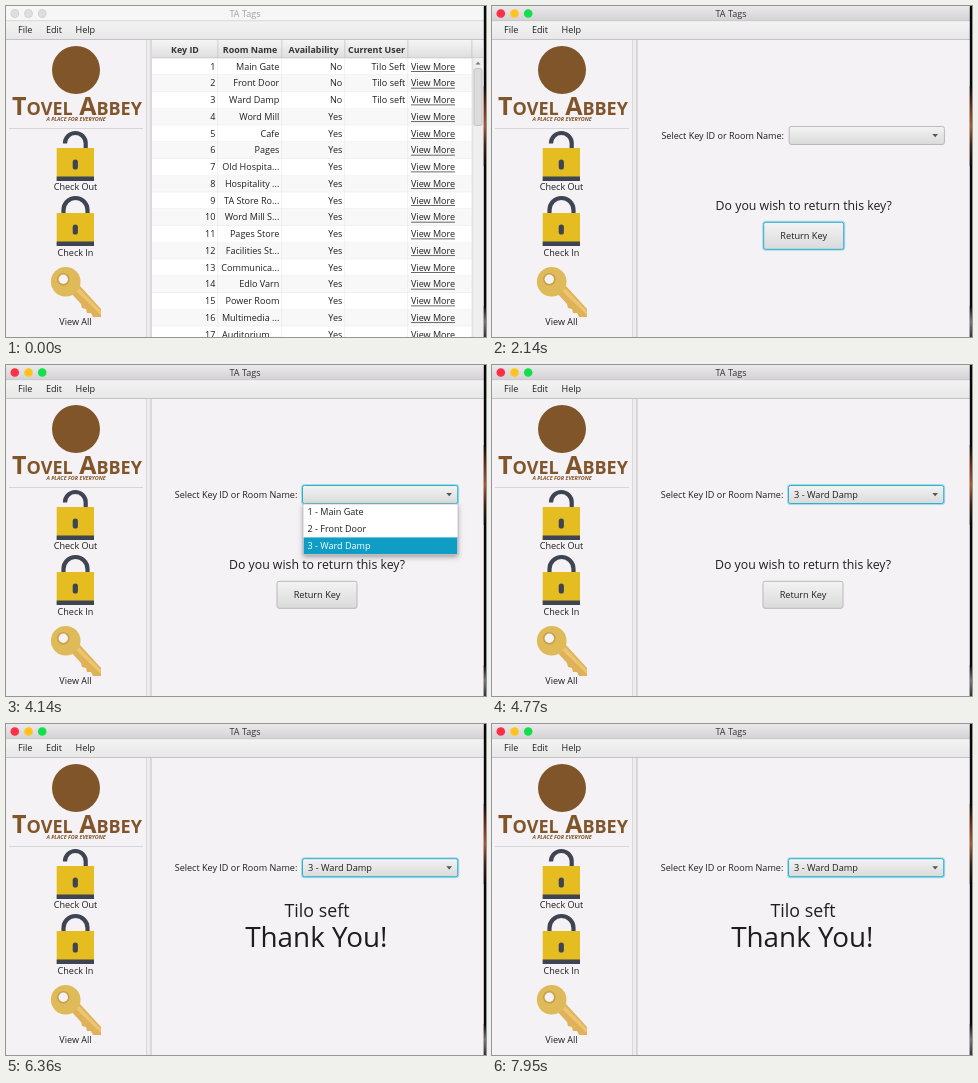
Animation of 480 by 331 pixels, one loop 8 s. Source, as an HTML page with a canvas:

```html
<!DOCTYPE html>
<html lang="en">
<head>
<meta charset="utf-8">
<style>
  html, body { margin: 0; height: 100%; overflow: hidden; background: #f4f2f4; }
  canvas { display: block; width: 100vw; height: 100vh; }
</style>
</head>
<body>
<canvas id="stage" width="480" height="331"></canvas>
<script>
const ctx = document.getElementById('stage').getContext('2d');
const LOOP = 8000;
// Moments of the user's actions, in ms
const OPEN_PAGE = 1500, OPEN_LIST = 2900, SELECT = 4600, RETURN = 5900;
const HOVERS = [3050, 3250, 3450];

const INK = '#1e1e1e', PAPER = '#f4f2f4', DARK = '#3e4452', GOLD = '#e6bd20';
const BROWN = '#80552a', CYAN = '#2fb0cf';
const ROOMS = ['Main Gate', 'Front Door', 'Ward Damp', 'Word Mill', 'Cafe', 'Pages',
  'Old Hospita...', 'Hospitality ...', 'TA Store Ro...', 'Word Mill S...', 'Pages Store',
  'Facilities St...', 'Communica...', 'Edlo Varn', 'Power Room', 'Multimedia ...', 'Auditorium ...'];
const USERS = ['Tilo Seft', 'Tilo seft', 'Tilo seft'];
const COLUMNS = [['Key ID', 146, 212], ['Room Name', 212, 276], ['Availability', 276, 339],
  ['Current User', 339, 402], ['', 402, 466]];

function text(str, x, y, { size = 9.05, align = 'left', color = INK, style = '' } = {}) {
  ctx.font = `${style} ${size}px "Open Sans", "Noto Sans", sans-serif`;
  ctx.textAlign = align;
  ctx.fillStyle = color;
  ctx.fillText(str, x, y);
}

function rect(x, y, w, h, fill) {
  ctx.fillStyle = fill;
  ctx.fillRect(x, y, w, h);
}

function gradient(y1, y2, ...stops) {
  const g = ctx.createLinearGradient(0, y1, 0, y2);
  stops.forEach((color, i) => g.addColorStop(i / (stops.length - 1), color));
  return g;
}

function rounded(x, y, w, h, r, fill, stroke, width = 1) {
  ctx.beginPath();
  ctx.roundRect(x, y, w, h, r);
  if (fill) { ctx.fillStyle = fill; ctx.fill(); }
  if (stroke) { ctx.strokeStyle = stroke; ctx.lineWidth = width; ctx.stroke(); }
}

function circle(x, y, r, fill) {
  ctx.beginPath();
  ctx.arc(x, y, r, 0, 7);
  ctx.fillStyle = fill;
  ctx.fill();
}

function polygon(points, fill) {
  ctx.beginPath();
  points.forEach(([x, y]) => ctx.lineTo(x, y));
  ctx.closePath();
  ctx.fillStyle = fill;
  ctx.fill();
}

function control(x, y, w, h, focused) {
  if (focused) rounded(x - .5, y - .5, w + 1, h + 1, 2.5, null, '#a5dbe8', 2);
  rounded(x, y, w, h, 2, gradient(y, y + h, '#f3f3f3', '#dadada'), focused ? CYAN : '#b9b9b9');
}

function windowBar(active) {
  rect(0, 0, 478, 15, active ? gradient(0, 15, '#ebe9eb', '#d3d1d3') : '#f6f6f6');
  ['#fb2f45', '#ffc41c', '#12e04a'].forEach((color, i) => {
    const x = 8.8 + i * 13.7;
    circle(x, 7.5, 4.3, active ? color : '#c9c9c9');
    if (!active) circle(x, 7.5, 3.6, '#dedede');
  });
  text('TA Tags', 239, 11, { align: 'center', color: active ? '#333' : '#a3a3a3' });
  rect(0, 15, 478, 18, gradient(15, 33, '#f4f3f4', '#e9e8e9'));
  rect(0, 14.5, 478, .7, '#c8c8c8');
  rect(0, 33, 478, 1, '#c4c3c4');
  text('File', 12, 27);
  text('Edit', 40, 27);
  text('Help', 69.5, 27);
}

function padlock(top, open) {
  const left = open ? 59 : 57.5, right = open ? 79.7 : 81.5;
  const r = (right - left) / 2, arcY = top - 15 + r;
  ctx.beginPath();
  ctx.moveTo(left, open ? top - 4.5 : top);
  ctx.lineTo(left, arcY);
  ctx.arc(left + r, arcY, r, Math.PI, 0);
  ctx.lineTo(right, top);
  ctx.strokeStyle = DARK;
  ctx.lineWidth = 4.2;
  ctx.stroke();
  rect(50.7, top, 37.3, 33, GOLD);
  rect(50.7, top + 28.5, 37.3, 4.5, DARK);
  rounded(66.7, top + 11.5, 5.2, 10, 2.6, DARK);
}

function key() {
  polygon([[64, 286], [74, 280], [95, 303], [95, 311], [87, 311], [85, 307], [81, 307],
    [80, 303], [76, 302], [75, 298]], '#dfb158');
  polygon([[69, 284], [72, 281], [95, 305], [95, 309]], '#ecc56f');
  circle(59.7, 275.7, 14.8, '#dfba58');
  circle(57.3, 273.3, 6.3, '#c9a04a');
  circle(57.3, 273.3, 4.7, PAPER);
}

function sidebar() {
  circle(70, 64, 24, BROWN);
  text('Tovel Abbey', 71, 108.5, { size: 25, align: 'center', color: BROWN, style: 'small-caps bold' });
  text('A PLACE FOR EVERYONE', 70, 114.8, { size: 5.4, align: 'center', color: BROWN, style: 'italic bold' });
  rect(3, 122, 134, 1, '#d8d6d8');
  padlock(142, true);
  padlock(207, false);
  key();
  text('Check Out', 69.5, 184, { align: 'center' });
  text('Check In', 69.5, 250, { align: 'center' });
  text('View All', 69.5, 319.3, { align: 'center' });
  rect(140, 34, 1, 297, '#dad8da');
  rect(141, 34, 4, 297, '#eeedee');
  rect(144.5, 34, 1, 297, '#c2c0c2');
}

function table() {
  const top = 52.2, pitch = 16.75;
  rect(146, 34, 331, 297, '#fff');
  ROOMS.forEach((room, i) => {
    const y = top + i * pitch, base = y + 11.4;
    if (i % 2) rect(146, y, 320, pitch, '#f8f8f8');
    rect(146, y + pitch - .5, 320, .6, '#ececec');
    const user = USERS[i] || '';
    [i + 1, room, user ? 'No' : 'Yes', user].forEach((value, c) =>
      text(value, COLUMNS[c][2] - 2.7, base, { align: 'right' }));
    text('View More', 405, base);
    rect(405, base + 1.4, 44, .8, '#444');
  });
  rect(146, 34, 331, 18, gradient(34, 52, '#f5f5f5', '#dedede'));
  rect(146, 51.5, 331, .8, '#c6c6c6');
  COLUMNS.forEach(([title, left, right]) => {
    text(title, (left + right) / 2, 47, { size: 8.9, align: 'center', style: 'bold', color: '#333' });
    rect(right - .5, 34, .8, 18, '#c3c3c3');
    rect(right - .5, 52, .6, 279, '#e8e8e8');
  });
  rect(466.5, 52, 10.5, 279, '#efefef');
  rect(466.5, 52, .6, 279, '#d0d0d0');
  polygon([[469.5, 58.5], [474.5, 58.5], [472, 55.8]], '#777');
  rounded(468, 62.5, 8, 57, 2, '#dcdcdc', '#bcbcbc', .8);
}

function dropdown(time) {
  ctx.save();
  ctx.shadowColor = 'rgba(0,0,0,.35)';
  ctx.shadowBlur = 5;
  ctx.shadowOffsetY = 2;
  rect(297, 139, 155, 50.5, '#fff');
  ctx.restore();
  const hovered = HOVERS.filter(t => time >= t).length - 1;
  ROOMS.slice(0, 3).forEach((room, i) => {
    if (i === hovered) rect(297.5, 139 + i * 16.7, 154, 16.7, '#0f9dc6');
    text(`${i + 1} - ${room}`, 301.5, 150.3 + i * 16.7, { color: i === hovered ? '#fff' : INK });
  });
  ctx.strokeStyle = '#bdbdbd';
  ctx.lineWidth = .8;
  ctx.strokeRect(297, 139, 155, 50.5);
}

function returnPage(time) {
  const done = time >= RETURN, comboFocused = time >= OPEN_LIST;
  const shift = comboFocused ? 0 : .7;
  const y = done ? 134.7 : 120.5;
  text('Select Key ID or Room Name:', 291.3 + shift, y + 12.2, { align: 'right' });
  control(296.5 + shift, y, 155.2, 18, comboFocused);
  polygon([[440.3, y + 7.5], [446, y + 7.5], [443.2, y + 10.7]], '#555');
  if (time >= SELECT) text('3 - Ward Damp', 302, y + 12.2, { size: 9.2 });

  if (done) {
    text(USERS[2], 311, 193, { size: 17.8, align: 'center' });
    text('Thank You!', 310.3, 223, { size: 27.8, align: 'center' });
    return;
  }
  text('Do you wish to return this key?', 311 + shift, 204, { size: 12.3, align: 'center' });
  control(271 + shift, 216.3, 80, 27, !comboFocused);
  text('Return Key', 311 + shift, 233.2, { size: 9.2, align: 'center' });
  if (comboFocused && time < SELECT) dropdown(time);
}

function desktopEdge() {
  rect(477.8, 0, 2.2, 331, '#080808');
  rect(477.8, 80, 2.2, 80, gradient(80, 160, '#080808', '#6b2c16', '#a85a30', '#3a2018', '#080808'));
  rect(477.8, 300, 2.2, 31, gradient(300, 331, '#080808', '#777', '#333'));
}

function draw(now) {
  const time = now % LOOP, onReturnPage = time >= OPEN_PAGE;
  rect(0, 0, 480, 331, PAPER);
  sidebar();
  if (onReturnPage) returnPage(time); else table();
  windowBar(onReturnPage);
  desktopEdge();
  requestAnimationFrame(draw);
}
requestAnimationFrame(draw);
</script>
</body>
</html>
```
